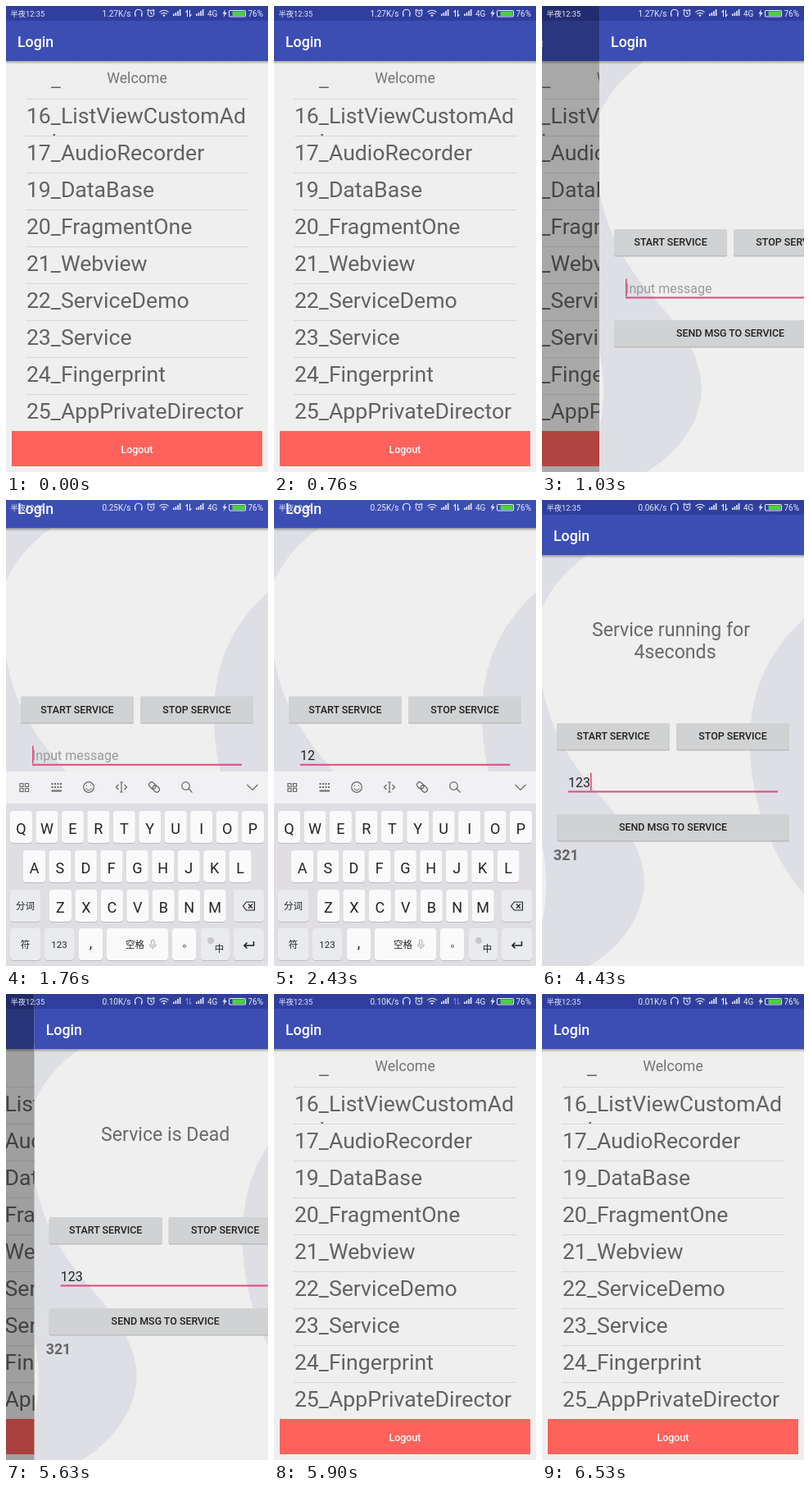
Write an HTML page that moves like this. It is 320x568 px and loops after 6.56 s.

```html
<!DOCTYPE html>
<html lang="en">
<head>
<meta charset="utf-8">
<title>Service demo</title>
<style>
  html, body { margin: 0; width: 100%; height: 100%; overflow: hidden; background: #efefef; }
  svg { display: block; width: 320px; height: 568px; }
  text { font-family: Roboto, "Noto Sans CJK SC", "Noto Sans CJK", sans-serif; white-space: pre; }
  .mid { text-anchor: middle; }
  .title { font-size: 17.78px; font-weight: 500; fill: #fff; }
  .row { font-size: 26.67px; fill: #626262; }
  .btn { font-size: 12.44px; font-weight: 500; fill: #202020; }
  .info { font-size: 23.11px; fill: #696969; }
  .stat { font-size: 10px; fill: #e8eaf6; }
  .key { font-size: 18px; fill: #222; }
  .small { font-size: 11.5px; fill: #222; }
  .line { fill: none; stroke: #666; stroke-width: 1.2; }
  .thin { fill: none; stroke: #e8eaf6; stroke-width: 1.1; }
</style>
</head>
<body>
<svg viewBox="0 0 320 568">
  <defs>
    <linearGradient id="shade" x2="0" y2="1">
      <stop stop-opacity=".32"/><stop offset="1" stop-opacity="0"/>
    </linearGradient>
    <g id="bar">
      <rect y="18" width="320" height="49" fill="#3c4eb4"/>
      <rect y="67" width="320" height="4" fill="url(#shade)"/>
      <text class="title" x="14" y="49.5">Login</text>
    </g>
    <path id="signal" d="M0 12V9.5H1.6V12ZM2.6 12V8H4.2V12ZM5.2 12V6H6.8V12ZM7.8 12V4H9.4V12Z"/>
  </defs>

  <g id="home">
    <rect width="320" height="568" fill="#efefef"/>
    <rect width="320" height="18" fill="#303f9f"/>
    <use href="#bar"/>
    <text class="mid" x="160" y="93.7" font-size="17.78" fill="#757575">Welcome</text>
    <path d="M55 98.4H66.8V100H55ZM57.5 156H60V158.4H57.5Z" fill="#626262"/>
    <g id="rows"></g>
    <rect x="7" y="518" width="306" height="43" fill="#fd625c"/>
    <text class="btn mid" x="160" y="544.5" style="fill:#fff">Logout</text>
  </g>
  <rect id="dim" width="320" height="568"/>

  <g id="page">
    <rect width="320" height="568" fill="#efefef"/>
    <rect width="320" height="18" fill="#303f9f"/>
    <g id="pan">
      <path fill="#dddfe5" d="M0 60H66Q18 90 0 132ZM0 225C12 290 40 325 70 360C105 400 125 430 125 468C123 510 95 545 58 568H0V515Q10 470 0 420ZM320 145C275 185 254 235 254 295C254 375 285 440 320 480Z"/>
      <use href="#bar"/>
      <text id="info1" class="info mid" x="157.5" y="166"></text>
      <text id="info2" class="info mid" x="162.5" y="193"></text>
      <text id="dead" class="info mid" x="160" y="179.3">Service is Dead</text>
      <g id="buttons"></g>
      <text id="hint" x="32" y="349.5" font-size="16" fill="#9a9a9a">Input message</text>
      <text id="typed" x="32" y="349.5" font-size="16" fill="#222"></text>
      <rect x="32" y="354.5" width="256" height="2" fill="#e2477c"/>
      <rect id="caret" y="332.5" width="1.6" height="21.5" fill="#e2477c"/>
      <text id="reply" x="14" y="439.3" font-size="17.78" font-weight="700" fill="#666">321</text>
    </g>
  </g>

  <g id="board">
    <rect y="331" width="320" height="237" fill="#e0dde3"/>
    <rect y="331" width="320" height="39" fill="#f1f1f3"/>
    <g class="line">
      <path d="M17 345.500h4v4h-4zM23.500 345.500h4v4h-4zM17 351.500h4v4h-4zM23.500 351.500h4v4h-4z"/>
      <path d="M55.500 346H68M55.500 350H68" stroke-dasharray="2 1.500" stroke-width="2"/>
      <path d="M55.500 354.500H68" stroke-width="2"/>
      <circle cx="101" cy="350" r="6.300"/>
      <path d="M97.500 351.500Q101 356 104.500 351.500M98.500 347.500v1M103.500 347.500v1"/>
      <path d="M139 344H143M141 344V356M139 356H143M137.500 347L134.500 350L137.500 353M144.500 347L147.500 350L144.500 353"/>
      <g transform="rotate(42 181 350)">
        <rect x="173.500" y="346.800" width="9" height="6.400" rx="3.200"/>
        <rect x="179.500" y="346.800" width="9" height="6.400" rx="3.200"/>
      </g>
      <circle cx="219.500" cy="348.500" r="4.800"/>
      <path d="M223 352L227.500 356.500M294.500 347L301 353.500L307.500 347"/>
    </g>
    <g id="keys"></g>
    <g class="line" style="stroke:#222">
      <path d="M289.500 495L293.500 490H303.500V500H293.500ZM296 492.500L301 497.500M301 492.500L296 497.500"/>
      <path d="M302.500 538V543H291M294.500 539.500L291 543L294.500 546.500" stroke-width="1.600"/>
      <path d="M177.500 538a1.800 1.800 0 0 1 3.600 0v3a1.800 1.800 0 0 1-3.600 0zM175.500 541q0 4 3.800 4t3.800-4M179.300 545v2.500" style="stroke:#b5b5b8"/>
    </g>
    <circle cx="250" cy="537" r="4" fill="#c9c9cc"/>
  </g>

  <g>
    <text class="stat" x="5.500" y="12.500" style="font-size:9.300px">半夜12:35</text>
    <text id="rate" class="stat" x="152.500" y="12.700" text-anchor="end"></text>
    <g class="thin">
      <path d="M157.500 11V8.500a4.300 4.300 0 0 1 8.600 0V11M158 9.500v3.500M165.600 9.500v3.500"/>
      <circle cx="177" cy="9" r="3.800"/>
      <path d="M177 6.800V9.300H179M172.500 6L174.500 4M181.500 6L179.500 4"/>
      <path d="M187.500 7.500Q193 3 198.500 7.500M189.500 9.800Q193 7 196.500 9.800"/>
      <rect x="272.500" y="5.500" width="20" height="7.500" rx="1.500"/>
    </g>
    <path d="M191.300 11.200Q193 9.800 194.700 11.200L193 13.200ZM268 4L264.500 9.500H266.800L265.500 14L269.800 8H267.300Z" fill="#e8eaf6"/>
    <use href="#signal" x="204" fill="#e8eaf6"/>
    <use href="#signal" x="232" fill="#e8eaf6"/>
    <path id="arrows" class="thin" d="M221.500 13V5.500L219.500 7.500M224.500 5V12.500L226.500 10.500"/>
    <rect x="276.500" y="6.500" width="15" height="5.500" fill="#4bd33c"/>
    <text class="stat" x="246" y="12.700">4G</text>
    <text class="stat" x="295.500" y="12.700">76%</text>
  </g>
</svg>
<script>
const LOOP = 6560;
const $ = id => document.getElementById(id);

const names = ["16_ListViewCustomAd", "17_AudioRecorder", "19_DataBase", "20_FragmentOne",
  "21_Webview", "22_ServiceDemo", "23_Service", "24_Fingerprint", "25_AppPrivateDirector"];
$("rows").innerHTML = names.map((name, i) =>
  `<rect x="24" y="${113 + 45 * i}" width="272" height="1" fill="#d3d8da"/>
   <text class="row" x="24.9" y="${142.5 + 45 * i}">${name}</text>`).join("");

const button = (id, x, y, w, label) =>
  `<rect x="${x}" y="${y + 1}" width="${w}" height="32.500" rx="2" fill="#bbb"/>
   <rect id="${id}" x="${x}" y="${y}" width="${w}" height="32" rx="2"/>
   <text class="btn mid" x="${x + w / 2}" y="${y + 20.4}">${label}</text>`;
$("buttons").innerHTML = button("start", 18, 272, 138, "START SERVICE") +
  button("stop", 164, 272, 138, "STOP SERVICE") +
  button("send", 18, 383, 284, "SEND MSG TO SERVICE");

const key = (x, y, w, label = "", cls = "key", fill = "#fafafb", dx = 0, dy = 0) =>
  `<rect x="${x}" y="${y + 1}" width="${w}" height="39" rx="4" fill="#bdbbc1"/>
   <rect x="${x}" y="${y}" width="${w}" height="39" rx="4" fill="${fill}"/>
   <text class="${cls} mid" x="${x + w / 2 + dx}" y="${y + (cls == "key" ? 28 : 24) + dy}">${label}</text>`;
const letters = (chars, x, y) =>
  [...chars].map((c, i) => key(x + 31.45 * i, y, 27, c)).join("");
const grey = "#e9ebee";
$("keys").innerHTML = letters("QWERTYUIOP", 5, 379) + letters("ASDFGHJKL", 21, 427) +
  letters("ZXCVBNM", 53, 475) +
  key(5, 475, 37, "分词", "small", grey) + key(278, 475, 37, "", "small", grey) +
  key(5, 522, 37, "符", "small", grey) + key(47, 522, 36, "123", "small", grey) +
  key(89, 522, 29, ",", "key", "#fafafb", 0, -4) + key(123, 522, 75, "空格", "small", "#fafafb", -3) +
  key(203, 522, 29, "。", "small", "#fafafb", 4, -1) +
  key(238, 522, 35, "中", "small", grey, 5, 5) + key(278, 522, 37, "", "small", grey);

const ramp = (t, from, span) => Math.min(1, Math.max(0, (t - from) / span));
const easeOut = u => 1 - (1 - u) ** 2;
const smooth = u => u * u * (3 - 2 * u);
const within = (t, a, b) => t >= a && t < b;
// Value of the last [time, value] step reached
const step = (t, steps) => steps.filter(s => s[0] <= t).pop()[1];
const show = (id, on) => $(id).setAttribute("visibility", on ? "inherit" : "hidden");
const move = (id, x, y) => $(id).setAttribute("transform", `translate(${x} ${y})`);
const fill = (id, pressed) => $(id).setAttribute("fill", pressed ? "#c8c9d6" : "#d1d2d3");

const rates = [[0, "1.27"], [1400, "0.25"], [3700, "0.06"], [5050, "0.10"], [6000, "0.01"]];
const typing = [[0, ""], [2000, "1"], [2260, "12"], [2530, "123"]];
const focus = [0, 1000, 1740, 2000, 2260, 2530].map(t => [t, t]);
const RUN = 3230, SECOND = 290, DEAD = 5250;

function draw(t) {
  const closing = t > 3000;
  const p = closing ? 1 - smooth(ramp(t, 5596, 171)) : easeOut(ramp(t, 940, 171));
  move("home", -320 * p * (closing ? 0.24 : 0.226), 0);
  $("dim").setAttribute("opacity", 0.38 * p);
  move("page", 320 * (1 - p), 0);
  show("page", p > 0);

  const k = easeOut(ramp(t, 1600, 100)) - smooth(ramp(t, 2760, 100));
  move("board", 0, 237 * (1 - k));
  show("board", k > 0);
  move("pan", 0, -32.8 * k);

  const text = step(t, typing);
  $("typed").textContent = text;
  show("hint", !text);
  $("caret").setAttribute("x", 32 + (text ? $("typed").getComputedTextLength() : 0));
  show("caret", Math.floor((t - step(t, focus)) / 114.5) % 2 == 0);

  const running = within(t, RUN, DEAD);
  $("info1").textContent = running ? "Service running for" : "";
  $("info2").textContent = running ? Math.floor((t - RUN) / SECOND) + "seconds" : "";
  show("dead", t >= DEAD);
  show("reply", t >= 4400);
  fill("start", within(t, 3130, 3250));
  fill("send", within(t, 4300, 4400));
  fill("stop", within(t, 5150, 5250));

  $("rate").textContent = step(t, rates) + "K/s";
  $("arrows").setAttribute("opacity", within(t, 2900, 3900) || within(t, 5300, 6000) ? 0.4 : 1);
}

const begin = performance.now();
function tick() {
  draw((performance.now() - begin) % LOOP);
  requestAnimationFrame(tick);
}
tick();
</script>
</body>
</html>
```
